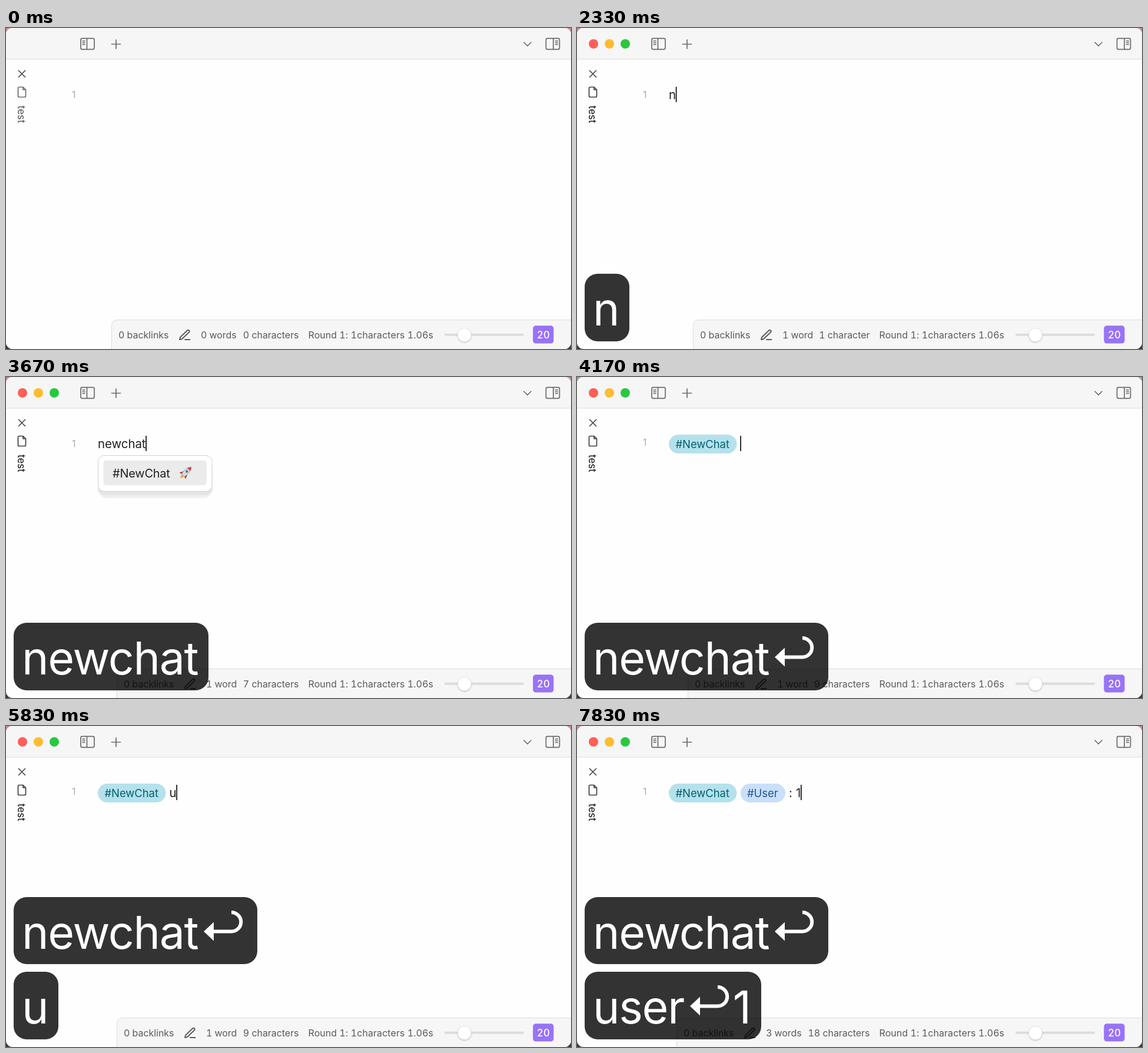
An HTML page that plays this animation: 960x546 px, repeating every 8 s.

```html
<!DOCTYPE html>
<html lang="en">
<head>
<meta charset="utf-8">
<title>Typing tags</title>
<style>
  html, body { margin: 0; width: 100%; height: 100%; overflow: hidden; }
  body { background: linear-gradient(#c98f8f, #3a3a3e 60%); }
  #stage {
    position: relative; width: 960px; height: 546px; overflow: hidden;
    border-radius: 11px; background: #fefefe;
    font-family: Inter, "Liberation Sans", sans-serif; font-optical-sizing: none;
  }
  svg { display: block; }
  .icon { fill: none; stroke: #6a6a6a; stroke-width: 1.7; stroke-linecap: round; stroke-linejoin: round; }
  .editor { font-size: 20.5px; letter-spacing: -.1px; fill: #222; }
  .choice { font-size: 20px; letter-spacing: -.25px; fill: #222; }
  .tag { font-size: 18.5px; letter-spacing: -.1px; }
  .status { font-size: 16px; letter-spacing: -.05px; fill: #5a5a5a; font-variant-numeric: tabular-nums; }
  #keys {
    position: absolute; left: 13px; bottom: 13.5px;
    display: flex; flex-direction: column; align-items: flex-start; gap: 13px;
  }
  .row {
    display: flex; height: 114.5px; padding: 0 18px 0 14px; border-radius: 22px;
    background: rgba(0, 0, 0, .8); color: #fff;
    font-size: 77px; line-height: 121px; letter-spacing: -1.3px;
  }
</style>
</head>
<body>
<div id="stage">
  <svg width="960" height="546" viewBox="0 0 960 546">
    <defs>
      <filter id="soft" x="-30%" y="-30%" width="160%" height="170%">
        <feDropShadow dx="0" dy="1" stdDeviation="1.2" flood-opacity=".28"/>
      </filter>
      <g id="panel" class="icon">
        <rect x="-11.5" y="-9.3" width="23" height="18.6" rx="2.5"/>
        <path d="M-1-9V9M-8.3-5h3.800M-8.300-2h3.800M-8.300 1h3.800"/>
      </g>
    </defs>

    <!-- title bar -->
    <path fill="#f6f6f6" d="M0 0H960V53H0z"/>
    <path fill="#dedede" d="M0 52.5H960v1H0z"/>
    <g id="lights">
      <circle cx="28" cy="27" r="8" fill="#ff5f57"/>
      <circle cx="55" cy="27" r="8" fill="#febc2e"/>
      <circle cx="82" cy="27" r="8" fill="#28c840"/>
    </g>
    <use href="#panel" transform="translate(138.5 27)"/>
    <use href="#panel" transform="translate(929 27) scale(-1 1)"/>
    <path class="icon" d="M179.5 27.5h15M187 20v15M880 24.5l6 6 6-6"/>

    <!-- vertical tab -->
    <path class="icon" style="stroke:#484848" d="M21.5 72.5l11 11m0-11l-11 11"/>
    <path class="icon" id="doc" d="M29 100.5h-6.5q-2 0-2 2v13q0 2 2 2h9q2 0 2-2v-10.5zv4.5h4.5"/>
    <text id="tab" font-size="17" transform="translate(20.4 132) rotate(90)">test</text>

    <!-- editor line -->
    <text id="lineNo" x="118.5" text-anchor="end" font-size="16" fill="#aaa">1</text>
    <text id="typed" class="editor" y="121"></text>
    <g id="chatTag">
      <rect x="156" y="98" width="115.5" height="32" rx="16" fill="#b5e1ec"/>
      <text class="tag" x="167.5" y="121" fill="#00616e">#NewChat</text>
    </g>
    <g id="userTag">
      <rect x="278" y="98" width="76" height="32" rx="16" fill="#c9dffa"/>
      <text class="tag" x="289" y="121" fill="#235795">#User</text>
      <text class="editor" x="360" y="121">:</text>
    </g>
    <rect id="caret" y="100" width="1.6" height="26" fill="#000"/>

    <!-- suggestions -->
    <g id="chatMenu">
      <g class="menu" data-x="156" data-width="194"></g>
      <text class="choice" x="181" y="171">#NewChat</text>
      <g transform="translate(305.5 162.5) rotate(45)">
        <path fill="#f5a623" d="M-2.5 7Q0 19 2.5 7z"/>
        <path fill="#b8332e" d="M-4 0L-7.5 8-3 6.5zM4 0L7.5 8 3 6.5z"/>
        <path fill="#d5dade" stroke="#7d858c" stroke-width=".6" d="M0-13C5-8 5 2 3 7H-3C-5 2-5-8 0-13z"/>
        <path fill="#d9443c" d="M0-13Q2.7-10.5 3.6-7H-3.6Q-2.7-10.5 0-13z"/>
        <circle cy="-2.5" r="2" fill="#3f6f95"/>
      </g>
    </g>
    <g id="userMenu">
      <g class="menu" data-x="278" data-width="164"></g>
      <text class="choice" x="302.5" y="171">#User :</text>
      <path fill="#f3f3f3" stroke="#a5a5a5" d="M391 168q0 3-3 4.5 4 0 6.5-3c16 1 15-16 2-16-13 0-13.5 11-5.5 14.5z"/>
      <path stroke="#555" stroke-width="2" stroke-linecap="round" d="M392 161.5h0m4.2 0h0m4.2 0h0"/>
    </g>

    <!-- status bar -->
    <g class="status">
      <g id="counts">
        <path fill="#f6f6f6" stroke="#dcdcdc" d="M179.5 560V506.5q0-10 10-10H1000V560z"/>
        <text x="191" y="528">0 backlinks</text>
        <path class="icon" style="stroke:#5a5a5a;stroke-width:1.9" transform="translate(292 510.5)"
          d="M12 19.5h8.5M16 4a2.1 2.1 0 0 1 3 3L7 18.5l-4 1 1-4z"/>
        <text id="words" x="331" y="528"></text>
      </g>
      <text id="chars" x="497.5" y="528" text-anchor="end"></text>
      <text x="513.5" y="528" style="letter-spacing:.07px">Round 1: 1characters 1.06s</text>
      <rect x="745" y="519.8" width="135" height="4" rx="2" fill="#dcdcdc"/>
      <circle cx="779" cy="522" r="11.5" fill="#fff" stroke="#d8d8d8" stroke-width=".6" filter="url(#soft)"/>
      <rect x="895.3" y="506.2" width="35.2" height="30.4" rx="5" fill="#9873f7"/>
      <text x="913" y="528" text-anchor="middle" style="font-size:17px;font-weight:500;fill:#fff">20</text>
    </g>
  </svg>

  <div id="keys">
    <div class="row" id="row1"><span></span></div>
    <div class="row" id="row2"><span></span><span></span></div>
  </div>
</div>

<script>
const LOOP = 8000;
const ACTIVATE = 330;
const CHAT_KEYS = [2170, 2500, 2670, 3000, 3170, 3330, 3500];
const CHAT_ENTER = 3830;
const USER_KEYS = [5830, 6000, 6000, 6170];
const USER_ENTER = 6830;
const DIGIT = 7670;
const ARROW_DELAY = 170;
const COUNT_DELAY = 160;
const CARET_RESETS = [ACTIVATE, ...CHAT_KEYS, CHAT_ENTER, ...USER_KEYS, USER_ENTER, DIGIT];

const $ = id => document.getElementById(id);
const show = (el, on) => { el.style.display = on ? '' : 'none'; };
const countBefore = (times, t) => times.filter(time => time <= t).length;

document.querySelectorAll('.menu').forEach(menu => {
  const x = +menu.dataset.x, w = +menu.dataset.width;
  const box = (dx, y, width, height, r, style) =>
    `<rect x="${x + dx}" y="${y}" width="${width}" height="${height}" rx="${r}" ${style}/>`;
  menu.innerHTML =
    box(0, 145, w + 1, 61, 16, 'fill="#f0f0f0"') +
    box(0, 142, w + 1, 59, 12, 'fill="#e5e5e5"') +
    box(.5, 133.5, w - .5, 61, 10, 'fill="#fff" stroke="#d2d2d2"') +
    box(9.5, 142, w - 18.5, 42, 5, 'fill="#ebebeb"');
});

function addArrow(span) {
  span.insertAdjacentHTML('afterend',
    `<svg width="83" height="114">
      <path d="M57 26a16.25 16.25 0 0 1 0 32.5H25" fill="none" stroke="#fff" stroke-width="6"/>
      <path d="M10 58.5L27 42.5v32z" fill="#fff"/>
    </svg>`);
  return span.nextElementSibling;
}
const chatWord = $('row1').children[0];
const [userWord, userDigit] = $('row2').children;
const chatArrow = addArrow(chatWord);
const userArrow = addArrow(userWord);

function drawEditor(t, chat, user) {
  const active = t >= ACTIVATE;
  const chatDone = t >= CHAT_ENTER, userDone = t >= USER_ENTER;
  show($('lights'), active);
  $('tab').setAttribute('fill', active ? '#111' : '#555');
  $('doc').style.stroke = active ? '#3c3c3c' : '#6a6a6a';
  $('lineNo').setAttribute('y', chatDone ? 117 : 119);

  const typed = $('typed');
  const start = userDone ? 372 : chatDone ? 277.5 : 156;
  typed.textContent = userDone ? (t >= DIGIT ? '1' : '') : chatDone ? user : chat;
  typed.setAttribute('x', start);

  show($('chatTag'), chatDone);
  show($('userTag'), userDone);
  show($('chatMenu'), chat.length === 7 && !chatDone);
  show($('userMenu'), user.length === 4 && !userDone);

  const lastReset = Math.max(...CARET_RESETS.filter(time => time <= t));
  const width = typed.textContent ? typed.getComputedTextLength() : 0;
  show($('caret'), active && (t - lastReset) % 1000 < 500);
  $('caret').setAttribute('x', start + width - .2);
}

function drawStatus(t) {
  const chat = countBefore(CHAT_KEYS, t), user = countBefore(USER_KEYS, t);
  const chars = t >= DIGIT ? 18 : t >= USER_ENTER ? 17 : t >= CHAT_ENTER ? 9 + user : chat;
  const words = t >= DIGIT ? 3 : user ? 2 : chat ? 1 : 0;
  const plural = (n, noun) => `${n} ${noun}${n === 1 ? '' : 's'}`;
  const shift = (words === 1 ? 9 : 0) + (chars === 1 ? 9 : 0) - (chars > 9 ? 10 : 0);
  $('words').textContent = plural(words, 'word');
  $('chars').textContent = plural(chars, 'character');
  $('counts').setAttribute('transform', `translate(${shift})`);
}

function drawKeys(t, chat, user) {
  chatWord.textContent = chat;
  userWord.textContent = user;
  userDigit.textContent = t >= DIGIT ? '1' : '';
  show($('row1'), chat);
  show($('row2'), user);
  show(chatArrow, t >= CHAT_ENTER + ARROW_DELAY);
  show(userArrow, t >= USER_ENTER + ARROW_DELAY);
}

function draw(t) {
  const chat = 'newchat'.slice(0, countBefore(CHAT_KEYS, t));
  const user = 'user'.slice(0, countBefore(USER_KEYS, t));
  drawEditor(t, chat, user);
  drawStatus(t - COUNT_DELAY);
  drawKeys(t, chat, user);
}

function frame() {
  draw(performance.now() % LOOP);
  requestAnimationFrame(frame);
}
frame();
</script>
</body>
</html>
```
